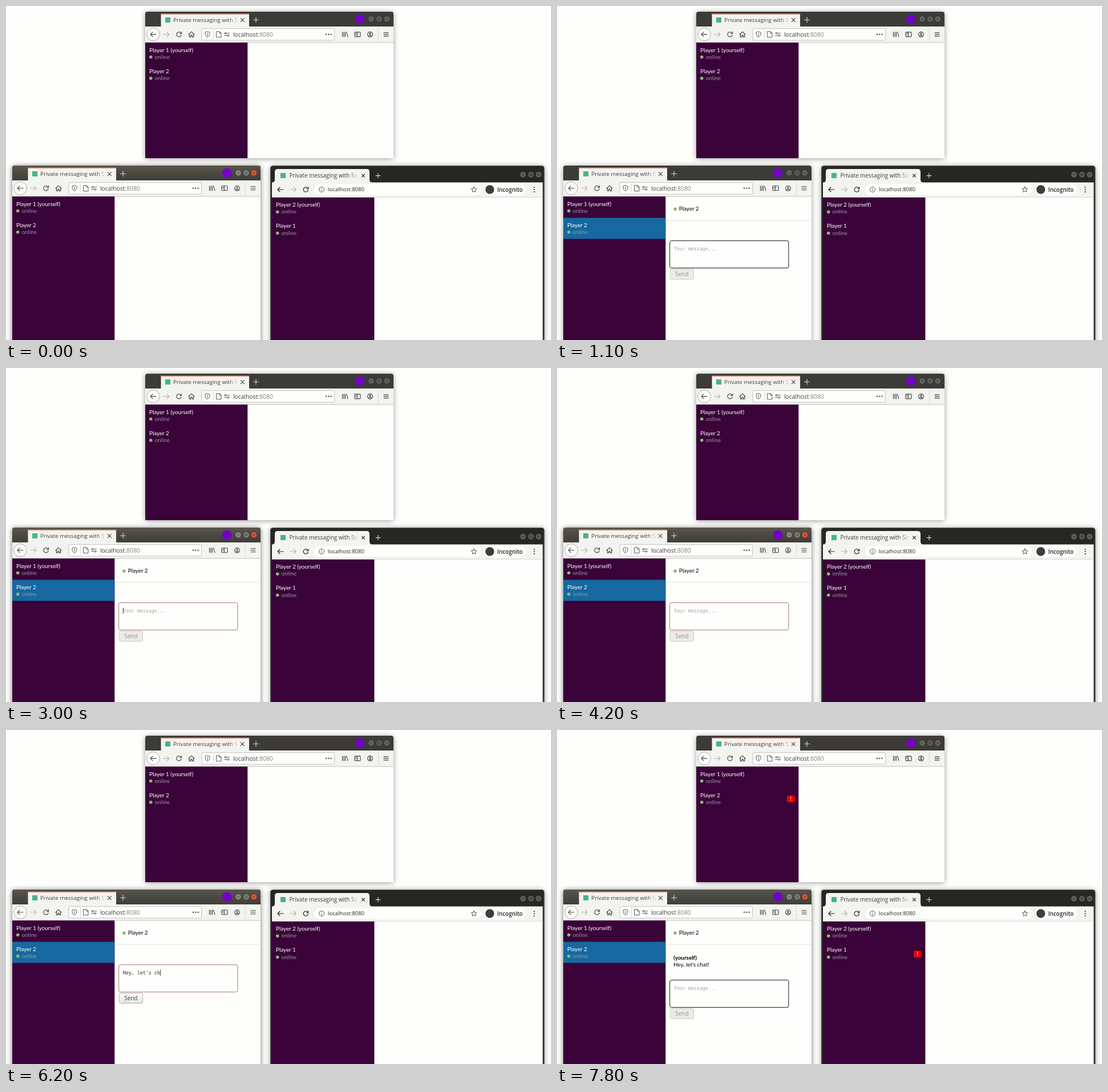
Animation, 955 px wide and 586 px high, one loop 8 s. Source, as an HTML page:

```html
<!DOCTYPE html>
<html lang="en">
<head>
<meta charset="utf-8">
<title>Private messaging</title>
<style>
html, body { margin: 0; width: 100%; height: 100%; overflow: hidden; background: #fefefc; }
svg { display: block; width: 955px; height: 586px; }
text { white-space: pre; }
.ui { font-family: "Open Sans", "Noto Sans", sans-serif; fill: #3f3e3a; }
.page { font: 9.85px Lato, sans-serif; }
.mono { font: 8.34px "DejaVu Sans Mono", monospace; }
.icon { fill: none; stroke: #454541; stroke-width: 1.15; stroke-linecap: round; stroke-linejoin: round; }
.dark { stroke: #222; fill: none; }
.fine { stroke-width: .9; }
.pale { stroke: #b4b4b0; }
.light { stroke: #d8d8d2; }
</style>
</head>
<body>
<svg id="stage" viewBox="0 0 955 586">
  <defs>
    <linearGradient id="bar" x2="0" y2="1"><stop stop-color="#58564d"/><stop offset="1" stop-color="#3d3c37"/></linearGradient>
    <linearGradient id="button" x2="0" y2="1"><stop stop-color="#fefefd"/><stop offset="1" stop-color="#e4e4e1"/></linearGradient>
    <linearGradient id="fade"><stop stop-color="#f3f3ef" stop-opacity="0"/><stop offset="1" stop-color="#f3f3ef"/></linearGradient>
  </defs>
</svg>
<script>
const LOOP = 8000;
const MESSAGE = "Hey, let's chat!";
const WHITE = "#fefefc";

const rect = (x, y, w, h, fill, more = "") =>
  `<rect x="${x}" y="${y}" width="${w}" height="${h}" fill="${fill}" ${more}/>`;
const circle = (x, y, r, fill, more = "") =>
  `<circle cx="${x}" cy="${y}" r="${r}" fill="${fill}" ${more}/>`;
const text = (x, y, value, kind, more = "") =>
  `<text x="${x}" y="${y}" class="${kind}" ${more}>${value}</text>`;
const icon = (x, y, d, more = "") =>
  `<path transform="translate(${x} ${y})" class="icon ${more}" d="${d}"/>`;
const group = (x, y, content, more = "") =>
  `<g transform="translate(${x} ${y})" ${more}>${content}</g>`;

const BACK = "M5 0H-5M-1 -4L-5 0L-1 4";
const FORWARD = "M-5 0H5M1 -4L5 0L1 4";
const RELOAD = "M3.3 -2.6A4.2 4.2 0 1 0 4.1 1M4.5 -4.5V-1.3H1.3";
const HOME = "M-5 .2L0 -4.6L5 .2M-3.6 -.6V4.6H-1.2V1.5H1.2V4.6H3.6V-.6";
const CROSS = "M-3 -3L3 3M3 -3L-3 3";
const PLUS = "M-4.5 0H4.5M0 -4.5V4.5";

function windowButtons(xs, y, disc, mark, close = disc) {
  const marks = ["M-2 0H2", "M-1.8 -1.8H1.8V1.8H-1.8Z", "M-1.7 -1.7L1.7 1.7M1.7 -1.7L-1.7 1.7"];
  return xs.map((x, i) => circle(x, y, 5.2, i == 2 ? close : disc, 'stroke="#2f2e2a" stroke-width=".6"') +
    `<path transform="translate(${x} ${y})" d="${marks[i]}" fill="none" stroke="${mark}"/>`).join("");
}

const person = (y, name) =>
  text(7, y, name, "page", 'fill="#fff"') +
  circle(9.7, y + 9, 2.8, "#86bb71") +
  text(16.5, y + 12.2, "online", "page", 'fill="#92959e"');

const badge = (x, y) => `<g class="badge">` +
  rect(x, y, 14, 12, "#e00505", 'rx="3"') +
  text(x + 7, y + 9.4, "!", "page", 'fill="#fff" text-anchor="middle"') + "</g>";

function topWindow(height) {
  const buttons = [396, 410, 423.3];
  return rect(0, 0, 435, height, "#3c3b37", 'rx="4" class="shadow"') +
    `<g class="idle">${windowButtons(buttons, 12.8, "#65645d", "#3a3935")}</g>` +
    `<g class="focus">${rect(0, 0, 435, 27, "url(#bar)", 'rx="4"')}
      ${windowButtons(buttons, 12.8, "#8b897f", "#3f3e39", "#e8552f")}</g>` +
    rect(27.5, 3, 154.5, 23.5, "#f3f3ef") + rect(27.5, 3, 154.5, 1.6, "#d4573a") +
    rect(35, 10, 9, 9, "#41b883") +
    text(49, 18.2, "Private messaging with S", "ui", 'font-size="9.8"') +
    rect(147, 6, 17, 18, "url(#fade)") +
    icon(170.3, 14.7, CROSS) + icon(194, 14.2, PLUS, "light") +
    circle(376, 12.8, 8.2, "#7301c8") +
    rect(0, 26, 435, 28, "#f3f3ef") + rect(0, 53.4, 435, .8, "#cbcbc7") +
    circle(14, 39.8, 11.3, "#fbfbf9", 'stroke="#a3a39f" stroke-width=".9"') +
    icon(14, 39.8, BACK) + icon(37, 39.8, FORWARD, "pale") +
    icon(59, 39.8, RELOAD) + icon(81, 39.8, HOME) +
    rect(99, 29.7, 232.5, 20.3, WHITE, 'rx="2" stroke="#bdbdb9" stroke-width=".9"') +
    icon(109, 39.8, "M0 -4.8L4 -3.5V-.5Q3.6 3 0 5Q-3.6 3 -4 -.5V-3.5ZM0 -2V2.2", "fine") +
    rect(119, 32, .8, 16, "#c9c9c5") +
    icon(129, 39.8, "M-4 -5H1L4 -2V5H-4ZM1 -5V-2H4", "fine") +
    icon(143, 39.8, "M-4.6 -2H-3.4M.8 -2H4.6M-4.6 2H-.8M3.4 2H4.6M-3.2 -2A1.4 1.4 0 1 0 -.4 -2A1.4 1.4 0 1 0 -3.2 -2M.4 2A1.4 1.4 0 1 0 3.2 2A1.4 1.4 0 1 0 .4 2", "fine") +
    text(154, 43.5, 'localhost<tspan fill="#85857f">:8080</tspan>', "ui", 'font-size="10.35"') +
    [317, 321.3, 325.6].map(x => circle(x, 39.8, 1.3, "#555550")).join("") +
    icon(350, 39.8, "M-4.5 -4V4M-2 -4V4M.5 -4V4M2.5 -4L5 4") +
    icon(372, 39.8, "M-4 -4H4Q5 -4 5 -3V3Q5 4 4 4H-4Q-5 4 -5 3V-3Q-5 -4 -4 -4ZM-.5 -4V4M-3.2 -1.8H-2M-3.2 .2H-2") +
    icon(394, 39.8, "M-4.5 0A4.5 4.5 0 1 0 4.5 0A4.5 4.5 0 1 0 -4.5 0M-1.5 -1A1.5 1.5 0 1 0 1.5 -1A1.5 1.5 0 1 0 -1.5 -1M-2.8 2.9Q0 1.2 2.8 2.9") +
    rect(408, 28, .8, 24, "#d2d2ce") +
    icon(422, 39.8, "M-4 -3H4M-4 0H4M-4 3H4") +
    rect(0, 54.2, 435, height - 54.2, WHITE) + rect(0, 54.2, 179.3, height - 54.2, "#3a0339");
}

const people = person(70.5, "Player 1 (yourself)") + person(107.8, "Player 2");

const composer = group(0, 0,
  rect(197.6, 411.8, 208.3, 47.9, WHITE, 'id="box" rx="3"') +
  text(204.7, 429, "", "mono", 'id="draft"') +
  rect(0, 420.5, .9, 10.5, "#222", 'id="caret"') +
  rect(198.2, 461.7, 41.4, 17.7, "", 'id="send" rx="2.2" stroke-width=".9"') +
  text(218.9, 474.2, "Send", "ui", 'id="label" font-size="9.9" text-anchor="middle"'), 'id="composer"');

const chat = `<g id="chat">` +
  rect(11, 371.6, 179.3, 37, "#1768a0") +
  group(11, 280, person(107.8, "Player 2")) +
  circle(207, 356.2, 2.8, "#86bb71") + text(213.8, 359.3, "Player 2", "page") +
  rect(190.3, 375.8, 255.7, .8, "#dcdcd9") +
  `<g id="sent">${text(204, 403.3, "(yourself)", "page", 'style="font-weight:700"')}
    ${text(204, 415.3, MESSAGE, "page")}</g>` + composer + "</g>";

const sideWindow =
  rect(463.5, 280.5, 479.5, 320, "#262623", 'rx="4" stroke="#55544f" class="shadow"') +
  windowButtons([906, 920, 933.3], 295.8, "#5f5e58", "#2b2a27") +
  `<path d="M465.5 310Q471 310 471 304V291Q471 286 476 286H632Q637 286 637 291V304Q637 310 642.5 310Z" fill="#f3f3ef"/>` +
  rect(481, 293, 9, 9, "#41b883") +
  text(496.6, 301.2, "Private messaging with So", "ui", 'font-size="9.9"') +
  rect(601, 288, 17, 18, "url(#fade)") + rect(617.5, 288, 4, 18, "#f3f3ef") +
  icon(626, 297.6, "M-2.5 -2.5L2.5 2.5M2.5 -2.5L-2.5 2.5", "dark") +
  icon(652, 297.6, "M-4 0H4M0 -4V4", "light") +
  rect(466, 309.5, 474.5, 26.5, "#f3f3ef") +
  icon(481, 322, BACK, "dark") + icon(503.3, 322, FORWARD, "pale") + icon(525.3, 322, RELOAD, "dark") +
  rect(540, 312.3, 292.5, 19.4, WHITE, 'rx="9.7"') +
  icon(553, 322, "M-4.5 0A4.5 4.5 0 1 0 4.5 0A4.5 4.5 0 1 0 -4.5 0M0 -.3V2.4M0 -2.3V-2.2", "fine") +
  text(563.8, 325.4, "localhost:8080", "ui", 'font-size="9.5" style="fill:#222"') +
  icon(820, 322, "M0 -4.8L1.4 -1.6L4.8 -1.3L2.2 1L3 4.4L0 2.6L-3 4.4L-2.2 1L-4.8 -1.3L-1.4 -1.6Z", "fine") +
  rect(838, 312.3, 73.5, 19.4, WHITE, 'rx="9.7"') +
  circle(847.7, 322, 7.7, "#3c3d3e") +
  text(860.7, 325.6, "Incognito", "ui", 'font-size="9.9" font-weight="600" style="fill:#222"') +
  [318, 322, 326].map(y => circle(925.6, y, 1.1, "#222")).join("") +
  rect(466, 335.2, 474.5, .8, "#d3d3cf") +
  rect(466, 336, 474.5, 260, WHITE) + rect(466, 336, 179.4, 260, "#3a0339") +
  group(466, 281.6, person(70.6, "Player 2 (yourself)") + person(107.9, "Player 1")) +
  badge(624.7, 387);

const stage = document.getElementById("stage");
stage.innerHTML += rect(0, 0, 955, 586, WHITE) +
  group(244, 10, topWindow(257) + people + badge(158.8, 105)) +
  group(11, 280, topWindow(320) + people, 'id="front"') + chat + sideWindow;

const $ = id => document.getElementById(id);
const show = (node, on) => node.style.display = on ? "" : "none";
const attrs = (node, values) => { for (const key in values) node.setAttribute(key, values[key]); };
const softShadow = a => `drop-shadow(0 1px 5px rgba(0,0,0,${a}))`;

for (const node of document.querySelectorAll(".shadow")) node.style.filter = softShadow(.4);
for (const node of document.querySelectorAll(".focus")) show(node, false);
const frontFocus = document.querySelector("#front .focus");
const frontShadow = document.querySelector("#front .shadow");
const badges = document.querySelectorAll(".badge");

// [time, characters typed]
const KEYS = [[4400, 1], [4500, 3], [4800, 4], [4900, 5], [5200, 6], [5300, 7], [5500, 8], [5700, 9],
  [5800, 10], [5900, 11], [6000, 12], [6200, 13], [6300, 14], [6400, 15], [6600, 16], [7600, 0]];
const within = (t, from, to) => t >= from && t < to;

function render(t) {
  const count = KEYS.reduce((n, [time, typed]) => t >= time ? typed : n, 0);
  const editing = within(t, 3000, 7000);
  const caretOff = within(t, 4200, 4400) || within(t, 5500, 5700) || within(t, 6600, 6700);
  const sent = t >= 7600;

  show(frontFocus, t < 1000 || t >= 2700);
  frontShadow.style.filter = softShadow(within(t, 1100, 2600) ? .4 : .55);
  show($("chat"), t >= 1000);
  show($("sent"), sent);
  $("composer").setAttribute("transform", `translate(0 ${sent ? 27 : 0})`);
  badges.forEach(node => show(node, t >= 7800));

  attrs($("box"), { stroke: editing ? "#a9776a" : "#111" });
  $("draft").textContent = count ? MESSAGE.slice(0, count) : "Your message...";
  attrs($("draft"), { fill: count ? "#2b2b2b" : "#a5a5a2" });
  show($("caret"), editing && !caretOff);
  attrs($("caret"), { x: 204.8 + 5.02 * count });

  const pressed = within(t, 7000, 7600);
  attrs($("send"), {
    fill: pressed ? "#dededb" : count ? "url(#button)" : "#ebebe8",
    stroke: count ? "#aaaaa4" : "#c6c6c2"
  });
  $("label").style.fill = count ? "#3c3c38" : "#92928e";
}

function tick(now) {
  render(now % LOOP);
  requestAnimationFrame(tick);
}
render(0);
requestAnimationFrame(tick);
</script>
</body>
</html>
```
